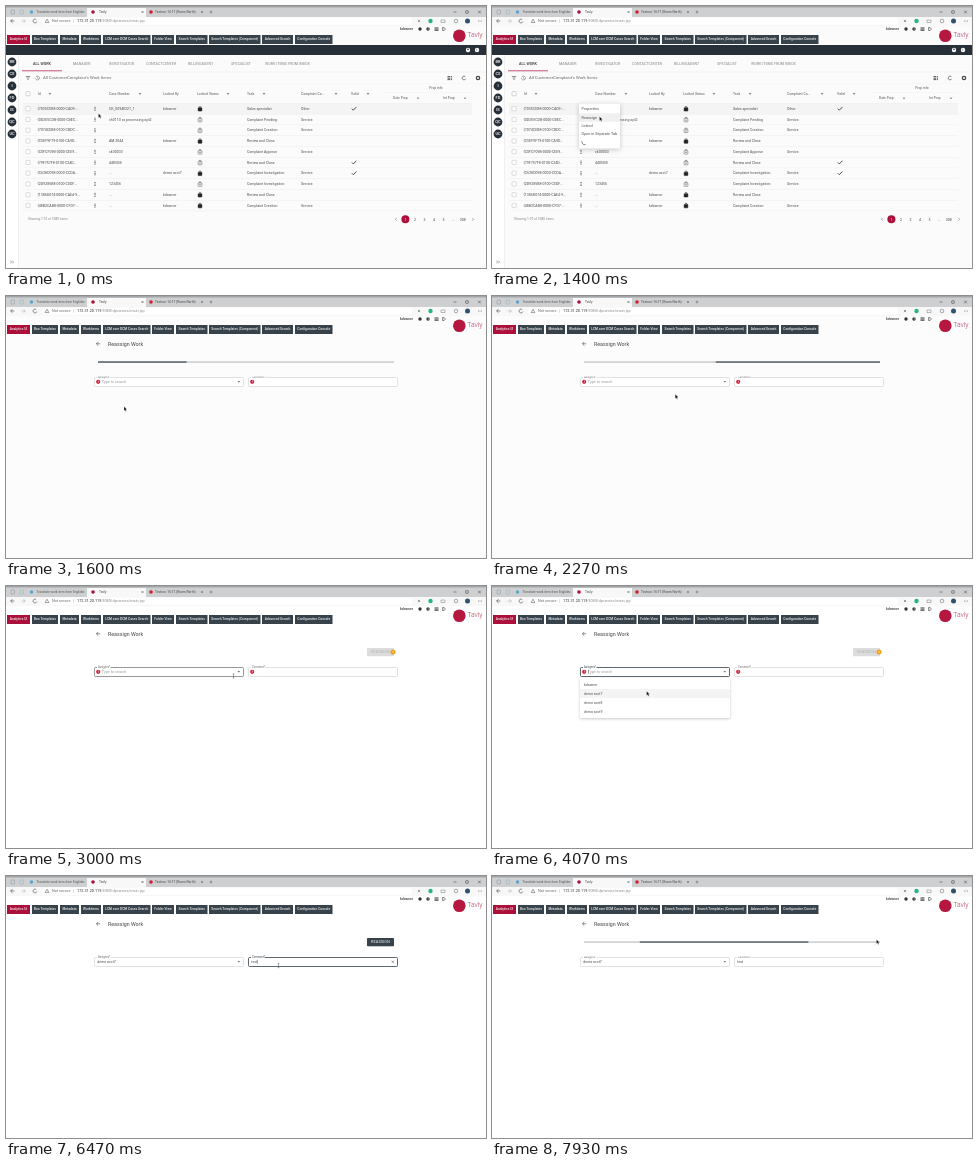
Recreate the animation shown at these times as an HTML page with a canvas. Size 480 by 262 pixels, loop 8 s.

```html
<!DOCTYPE html>
<html lang="en">
<head>
<meta charset="utf-8">
<title>Reassign work</title>
<style>
html, body { margin: 0; width: 100%; height: 100%; overflow: hidden; background: #fff; }
canvas { display: block; width: 480px; height: 262px; }
</style>
</head>
<body>
<canvas id="stage"></canvas>
<script>
const W = 480, H = 262, LOOP = 8000;
const canvas = document.getElementById('stage');
const dpr = window.devicePixelRatio || 1;
canvas.width = W * dpr;
canvas.height = H * dpr;
const c = canvas.getContext('2d');

const RED = '#ad0f3b', SLATE = '#37424b', INK = '#4a4a4a', ERR = '#d0213f';
const USER = 'kdowner', PICK = 'demo acct7', BRAND = 'Tavly';

// Event times in ms
const T = { menu: 480, page: 1435, ready: 2690, focus1: 3060, list: 3180, pick: 4480,
  close: 4610, focus2: 5190, type: 5700, send: 7460 };
const KEYS = [5700, 6000, 6330, 6470];
const PATH = [
  [0, 92.5, 107.5], [100, 92.5, 107.5], [380, 89.5, 103.5], [560, 89.5, 103.5],
  [1250, 107.5, 110.5], [1420, 107.5, 110.5], [1600, 118, 110.5], [1780, 118, 110.5],
  [2650, 227.5, 90], [3100, 227.5, 90], [3670, 212, 99], [4400, 112, 110],
  [4560, 112, 110], [5000, 272.5, 89.5], [7000, 272.5, 89.5], [7380, 384.5, 63.5], [8000, 384.5, 63.5]
];

const clamp = v => Math.max(0, Math.min(1, v));
const smooth = v => v * v * (3 - 2 * v);

function bezier(x1, y1, x2, y2) {
  const at = (s, a, b) => 3 * (1 - s) * (1 - s) * s * a + 3 * (1 - s) * s * s * b + s * s * s;
  return x => {
    if (x <= 0 || x >= 1) return clamp(x);
    let lo = 0, hi = 1;
    for (let i = 0; i < 24; i++) {
      const mid = (lo + hi) / 2;
      if (at(mid, x1, x2) < x) lo = mid; else hi = mid;
    }
    return at(lo, y1, y2);
  };
}
const easeLong = bezier(0.65, 0.815, 0.735, 0.395);
const easeShort = bezier(0.165, 0.84, 0.44, 1);

function rect(x, y, w, h, fill) {
  c.fillStyle = fill;
  c.fillRect(x, y, w, h);
}
function box(x, y, w, h, r, fill, stroke, lw = 0.5) {
  c.beginPath();
  c.roundRect(x, y, w, h, r);
  if (fill) { c.fillStyle = fill; c.fill(); }
  if (stroke) { c.strokeStyle = stroke; c.lineWidth = lw; c.stroke(); }
}
function dot(x, y, r, fill) {
  c.beginPath();
  c.arc(x, y, r, 0, 7);
  c.fillStyle = fill;
  c.fill();
}
function arc(x, y, r, a, b, stroke, lw = 0.6) {
  c.beginPath();
  c.arc(x, y, r, a, b);
  c.strokeStyle = stroke;
  c.lineWidth = lw;
  c.stroke();
}
// Polyline given as flat offsets from x, y
function line(x, y, pts, stroke, lw = 0.6) {
  c.beginPath();
  for (let i = 0; i < pts.length; i += 2) c.lineTo(x + pts[i], y + pts[i + 1]);
  c.strokeStyle = stroke;
  c.lineWidth = lw;
  c.stroke();
}
// Large font scaled down keeps glyph spacing even at tiny sizes
function text(s, x, y, size, fill = INK, weight = 400, align = 'left') {
  c.save();
  c.translate(x, y);
  c.scale(0.1, 0.1);
  c.font = `${weight} ${size * 10}px Roboto, "Open Sans", sans-serif`;
  c.textAlign = align;
  c.textBaseline = 'alphabetic';
  c.fillStyle = fill;
  c.fillText(s, 0, size * 3.5);
  const w = c.measureText(s).width / 10;
  c.restore();
  return w;
}
function cross(x, y, r, col, lw) {
  line(x, y, [-r, -r, r, r], col, lw);
  line(x, y, [-r, r, r, -r], col, lw);
}
function caretDown(x, y, col = '#555', r = 1.3) {
  c.beginPath();
  c.moveTo(x - r, y - r / 2);
  c.lineTo(x + r, y - r / 2);
  c.lineTo(x, y + r / 2);
  c.fillStyle = col;
  c.fill();
}
function arrowLeft(x, y, r, col, lw) {
  line(x, y, [r, 0, -r, 0], col, lw);
  line(x, y, [0, -r, -r, 0, 0, r], col, lw);
}

function browser() {
  rect(0, 0, W, 11, '#cdcfd1');
  rect(0, 0, W, 1.5, '#a3a6a8');
  rect(81, 2, 59, 9, '#f8f8f8');
  rect(0, 11, W, 9.2, '#f8f8f8');
  box(5, 4, 3.5, 4, 0.5, null, '#8a9096');
  box(14, 4, 3.5, 4, 0.5, null, '#8bb4c8');
  dot(25.5, 6, 1.7, '#5aa5cb');
  text('Translate work item from English', 30.5, 6, 3.2, '#555');
  cross(77.5, 6, 1, '#666', 0.4);
  dot(87, 6, 1.8, RED);
  text(BRAND, 93, 6, 3.3, '#444');
  cross(136.5, 6, 1, '#444', 0.5);
  dot(145, 6, 1.8, '#d11f2f');
  text('Testrun: 16:17 (Room North)', 149, 6, 3.2, '#444');
  cross(196, 6, 1, '#555', 0.5);
  line(205, 6, [-1.4, 0, 1.4, 0], '#555', 0.5);
  line(205, 6, [0, -1.4, 0, 1.4], '#555', 0.5);
  line(449, 6, [-1.5, 0, 1.5, 0], '#333', 0.5);
  box(459.7, 4.7, 2.6, 2.6, 0.3, null, '#333');
  cross(473.5, 6, 1.3, '#333', 0.5);

  arrowLeft(6.5, 15, 1.9, '#444', 0.6);
  line(17.5, 15, [-1.9, 0, 1.9, 0], '#b5b5b5');
  line(17.5, 15, [0, -1.9, 1.9, 0, 0, 1.9], '#b5b5b5');
  arc(29, 15, 1.9, 0.3, 5.4, '#444');
  box(36, 11.8, 370, 7, 3.5, '#fff');
  line(41, 15, [-1.9, 1.6, 0, -1.8, 1.9, 1.6, -1.9, 1.6], '#444', 0.5);
  text('Not secure', 46, 15, 3.8, '#666');
  rect(67, 13, 0.4, 4, '#bbb');
  const w = text('172.31.20.119', 71, 15, 3.8, '#333');
  text(':9080/dynamics/main.jsp', 71 + w, 15, 3.8, '#888');
  cross(413, 15, 1.1, '#666', 0.6);
  dot(424.5, 15, 2.2, '#27b580');
  line(437, 15, [-2, -1, 2, -1, 2, 1.5, -2, 1.5, -2, -1], '#777', 0.5);
  arc(450, 15, 1.8, 0, 7, '#6b7880');
  dot(461.5, 15, 2.5, '#2f5271');
  for (const d of [-1.4, 0, 1.4]) dot(474 + d, 15, 0.4, '#333');
}

const NAV = [
  [1, 23, 'Analytics UI'], [26, 26, 'Box Templates'], [54, 19, 'Metadata'],
  [75, 20, 'Workitems'], [97, 47.5, 'LCM over DCM Cases Search'], [146, 22, 'Folder View'],
  [170, 31.5, 'Search Templates'], [203, 51.5, 'Search Templates (Component)'],
  [256, 31, 'Advanced Search'], [289, 37.5, 'Configuration Console']
];
function header() {
  text(USER, 394, 23, 3.4, '#333', 500);
  dot(414, 23, 1.7, '#333');
  dot(422, 23, 1.7, '#333');
  text('i', 422, 23, 2.6, '#fff', 700, 'center');
  for (let i = 0; i < 3; i++) rect(428.5, 21.5 + i * 1.2, 4, 0.8, '#333');
  line(438, 23, [0.4, -1.5, -1.4, -1.5, -1.4, 1.5, 0.4, 1.5], '#333');
  line(438, 23, [-0.4, 0, 2, 0], '#333');
  dot(453.3, 29.7, 6.3, '#b5173f');
  text(BRAND, 461.2, 28.6, 6.8, '#b03a58', 300);
  NAV.forEach(([x, w, s], i) => {
    rect(x, 29, w, 9, i ? SLATE : RED);
    text(s, x + w / 2, 33.3, 3.3, '#f0f0f0', 500, 'center');
  });
}

const COLS = [[32, 'Id', 44], [103, 'Case Number', 134], [157, 'Locked By', 0], [191, 'Locked Status', 222],
  [241, 'Task', 258], [295, 'Complaint Ca...', 330], [345, 'Valid', 362]];
const SERVICE = 'Service';
const ROWS = [
  ['{7035CEB8-0000-CAD9-...', 'CK_00940321_1', USER, 1, 'Sales specialist', 'Other', 1],
  ['{0D3E5CDB-0000-CBEC...', 'ch0110 xx processing opt2', '', 0, 'Complaint Pending', SERVICE],
  ['{7074CEB8-0100-CBDC...', '', '', 0, 'Complaint Creation', SERVICE],
  ['{C5EF9F79-0100-CA9D...', 'AM 3044', USER, 1, 'Review and Close', ''],
  ['{C0FCF09B-0000-CEE9...', 'ck00033', '', 0, 'Complaint Approve', SERVICE],
  ['{79F757F8-0100-C24D...', '4485GB', '', 0, 'Review and Close', '', 1],
  ['{C638D098-0000-CCDA...', '...', PICK, 1, 'Complaint Investigation', SERVICE, 1],
  ['{2D9285B8-0100-CEDF...', '123456', '', 0, 'Complaint Investigation', SERVICE],
  ['{1386D074-0000-CAE4-9...', '...', USER, 1, 'Review and Close', ''],
  ['{48B2CAB8-0000-CFD7-...', '...', USER, 1, 'Complaint Creation', SERVICE]
];

function lock(x, y, shut) {
  arc(x, y - 1, 1.2, Math.PI, 7, shut ? '#222' : '#555', 0.6);
  box(x - 1.9, y - 0.9, 3.8, 3.3, 0.4, shut ? '#222' : '#fff', shut ? '#222' : '#555', 0.5);
  if (!shut) dot(x, y + 0.7, 0.6, '#555');
}

function workList() {
  rect(0, 20.2, W, H, '#fbfbfb');
  header();
  rect(0, 39, W, 10, '#273039');
  dot(462, 44, 2.2, '#fff');
  dot(462, 43.4, 0.8, '#273039');
  dot(471, 44, 2.2, '#fff');
  text('i', 471, 44, 3, '#273039', 700, 'center');

  rect(0, 49, 12.5, H, '#fff');
  rect(12.5, 49, 0.5, H, '#e2e2e2');
  ['BR', 'CS', 'I', 'FD', 'IS', 'QC', 'UC'].forEach((s, i) => {
    dot(6, 56 + i * 12, 4.4, '#273039');
    text(s, 6, 56 + i * 12, 4, '#fff', 500, 'center');
  });
  for (const d of [-1.2, 0.8]) line(5.5 + d, 256, [0, -1.4, 1.3, 0, 0, 1.4], '#555', 0.5);

  [[27, 'ALL WORK'], [67, 'MANAGER'], [103, 'INVESTIGATOR'], [140, 'CONTACTCENTER'], [182, 'BILLINGAGENT'],
    [225, 'SPECIALIST'], [259, 'WORK ITEMS FROM INBOX']]
    .forEach(([x, s], i) => text(s, x, 58, 3.7, i ? '#888' : '#333', i ? 400 : 500));
  rect(13, 65.8, W, 0.4, '#e4e4e4');
  rect(16, 64.5, 40, 0.7, RED);

  for (let i = 0; i < 3; i++) rect(19.8 + i * 0.8, 70.3 + i * 1.4, 4.4 - i * 1.6, 0.6, '#444');
  arc(31.5, 72, 2, -2.6, 3, '#555', 0.5);
  line(31.5, 72, [0, -1.1, 0, 0.2, 1, 0.7], '#555', 0.4);
  text("All CustomerComplaint's Work Items", 37, 72, 4.2, '#666');
  for (let i = 0; i < 3; i++) {
    rect(441.5, 70.2 + i * 1.5, 2.6, 0.9, '#444');
    rect(444.8, 70.2 + i * 1.5, 1.2, 0.9, '#444');
  }
  arc(458, 72, 1.8, 0.4, 5.6, '#444', 0.7);
  arc(472, 72, 1.7, 0, 7, '#444', 1.2);
  rect(13, 77.8, W, 0.3, '#ececec');

  box(20, 85.6, 4.2, 4.2, 0.6, '#fff', '#aaa');
  for (const [x, s, sort] of COLS) {
    text(s, x, 88, 3.4, '#777', 500);
    if (sort) caretDown(sort, 88);
  }
  text('Prop info', 430, 82.3, 3.3, '#777', 500, 'center');
  text('Date Prop', 387, 92.3, 3.3, '#777', 500);
  caretDown(412, 92.3);
  text('Int Prop', 437, 92.3, 3.3, '#777', 500);
  caretDown(459, 92.3);
  rect(378, 86.2, 88, 0.3, '#ececec');
  rect(17, 97.2, 449, 0.4, '#e4e4e4');

  ROWS.forEach(([id, num, by, shut, task, kind, ok], i) => {
    const y = 102.7 + i * 10.75;
    if (!i) rect(17, 97.5, 449, 10.6, '#f4f4f4');
    rect(17, y + 5.3, 449, 0.35, '#e6e6e6');
    box(20, y - 2.1, 4.2, 4.2, 0.6, '#fff', '#bbb');
    text(id, 31.5, y, 3.6, INK);
    for (const d of [-1.5, 0, 1.5]) dot(89, y + d, 0.55, '#333');
    text(num, 103, y, 3.55, INK);
    text(by, 157, y, 3.55, INK);
    lock(194, y, shut);
    text(task, 241, y, 3.55, INK);
    text(kind, 295, y, 3.55, INK);
    if (ok) line(348, y, [-2.2, 0, -0.7, 1.5, 2.4, -1.7], '#222', 0.8);
  });

  text('Showing 1-10 of 3080 items', 22, 213.3, 3.2, '#888');
  line(390, 213.3, [0.7, -1.4, -0.7, 0, 0.7, 1.4], '#555', 0.5);
  dot(399.4, 213.3, 4, RED);
  ['1', '2', '3', '4', '5', '...', '308'].forEach((s, i) =>
    text(s, 399.4 + i * 9.55, 213.3, 3.5, i ? '#444' : '#fff', 400, 'center'));
  line(467, 213.3, [-0.7, -1.4, 0.7, 0, -0.7, 1.4], '#555', 0.5);
}

function paper(x, y, w, h, blur) {
  c.save();
  c.shadowColor = 'rgba(0,0,0,.22)';
  c.shadowBlur = blur * dpr;
  c.shadowOffsetY = dpr;
  box(x, y, w, h, 1, '#fff');
  c.restore();
}

function menu(t) {
  const p = clamp((t - T.menu) / 200);
  if (!p) return;
  c.save();
  c.globalAlpha = p;
  paper(87, 97.5, 41, 45, 5);
  if (t > 900) rect(87, 107.3, 41, 8.4, '#f0f0f0');
  ['Properties', 'Reassign', 'Linked', 'Open in Separate Tab']
    .forEach((s, i) => text(s, 89.6, 103.1 + i * 8.3, 3.75, INK));
  const turn = Math.PI * 2 * (t - 1400) / 1400;
  arc(92.6, 136, 2.7, turn + 1.2, turn + 3.5, SLATE, 0.6);
  c.restore();
}

function progress(t, start) {
  const x = 92, w = 296, y = 65.4, h = 1.3, age = t - start;
  rect(x, y, w, h, '#c0c4c7');
  const bar = (l, r) => {
    l = clamp(l);
    r = clamp(r);
    if (r > l) rect(x + l * w, y, (r - l) * w, h, '#4c565e');
  };
  const a = easeLong((age % 2100) / 1260);
  bar(-0.35 + 1.35 * a, 1.9 * a);
  if (age > 1150) {
    const b = easeShort(((age - 1150) % 2100) / 1260);
    bar(-2 + 3.07 * b, 1.08 * b);
  }
}

function field(x, label, o) {
  const y = 81.5, w = 149, h = 9;
  const edge = o.focus ? SLATE : o.hover ? '#555' : '#cfcfcf';
  box(x + 0.5, y, w, h, 1, '#fff', edge, o.focus ? 0.8 : 0.6);
  rect(x + 3, y - 1, 13.5, 2, '#fff');
  text(label, x + 4, y - 0.8, 2.7, o.focus ? SLATE : '#666');
  let tx = x + 3.3;
  if (o.error) {
    dot(x + 4.2, 85.8, 2.1, ERR);
    rect(x + 3.95, 84.6, 0.5, 1.5, '#fff');
    rect(x + 3.95, 86.5, 0.5, 0.5, '#fff');
    tx = x + 7.8;
  }
  const tw = o.value ? text(o.value, tx, 85.8, 3.5, '#444') : 0;
  if (!o.value && o.hint) text(o.hint, tx, 85.8, 3.75, '#999');
  if (o.focus && o.caret) rect(tx + tw + 0.2, 83.7, 0.4, 4.2, '#333');
  if (o.focus && o.value) cross(x + w - (o.hint ? 11 : 4.2), 85.8, 1.2, '#555', 0.5);
  if (o.hint) caretDown(x + w - 4.2, 85.8, '#444');
}

function button(t) {
  const on = smooth(clamp((t - T.type) / 250));
  const face = (fill, ink) => {
    box(361, 62, 27, 8.2, 0.8, fill);
    text('REASSIGN', 374.5, 66, 4, ink, 400, 'center');
  };
  face('#dcdcdc', '#b4b4b4');
  if (on < 1) {
    c.globalAlpha = 1 - on;
    dot(387, 66, 2.5, '#f0a21d');
    rect(386, 65, 2, 1.6, '#f7c45a');
  }
  c.globalAlpha = on;
  face(t > 7300 ? '#29323a' : SLATE, '#f0f0f0');
  c.globalAlpha = 1;
}

function options(t) {
  const p = Math.min(clamp((t - T.list) / 120), clamp((T.close + 60 - t) / 60));
  if (!p) return;
  c.save();
  c.globalAlpha = p;
  paper(88, 92, 150, 40, 3);
  const over = Math.floor((mouse(t)[1] - 94) / 9);
  if (over >= 0 && over < 4) rect(88, 94 + over * 9, 150, 9, '#f4f4f4');
  [USER, PICK, 'demo acct8', 'demo acct9'].forEach((s, i) => text(s, 92, 98.5 + i * 9, 3.5, INK));
  c.restore();
}

function reassign(t) {
  const loading = t < T.ready, sent = t >= T.send;
  const [mx, my] = mouse(t);
  const over = x => my > 81 && my < 91 && mx > x && mx < x + 150;
  const typed = 'test'.slice(0, KEYS.filter(k => t >= k).length);
  rect(0, 20.2, W, H, loading ? '#fcfcfc' : '#fff');
  header();
  arrowLeft(92.3, 47.8, 1.9, '#444', 0.6);
  text('Reassign Work', 102, 47.8, 5.3, '#444');
  if (loading) progress(t, T.page);
  else if (sent) progress(t, T.send);
  else button(t);

  c.save();
  if (loading || sent) {
    c.beginPath();
    c.rect(0, 80.4, W, 30);
    c.clip();
  }
  const live = !loading && !sent;
  field(88, 'Assignee*', {
    error: t < T.pick, value: t < T.pick ? '' : PICK, hint: 'Type to search',
    focus: t >= T.focus1 && t < T.focus2, hover: live && over(88), caret: t > 4500 || t % 1000 < 500
  });
  field(242, 'Comment*', {
    error: !typed, value: typed, focus: t >= T.focus2 && !sent,
    hover: live && over(242), caret: true
  });
  c.restore();
  options(t);
}

function mouse(t) {
  const i = Math.max(1, PATH.findIndex(k => k[0] > t));
  const [t0, x0, y0] = PATH[i - 1], [t1, x1, y1] = PATH[i];
  const p = smooth(clamp((t - t0) / (t1 - t0)));
  return [x0 + (x1 - x0) * p, y0 + (y1 - y0) * p];
}

function pointer(t) {
  const [x, y] = mouse(t);
  const inField = t > T.page && y > 81 && y < 91 && x > 88 && x < 392;
  if (inField) {
    line(x, y, [0, -2, 0, 2], '#444', 0.5);
    line(x, y, [-0.9, -2.2, 0.9, -2.2], '#444', 0.4);
    line(x, y, [-0.9, 2.2, 0.9, 2.2], '#444', 0.4);
    return;
  }
  c.beginPath();
  [[0, 0], [0, 4.3], [1, 3.4], [1.7, 5], [2.4, 4.7], [1.7, 3.1], [3, 3]].forEach(([a, b]) => c.lineTo(x + a, y + b));
  c.closePath();
  c.fillStyle = '#111';
  c.fill();
  c.strokeStyle = '#fff';
  c.lineWidth = 0.2;
  c.stroke();
}

function draw(t) {
  c.setTransform(dpr, 0, 0, dpr, 0, 0);
  c.globalAlpha = 1;
  if (t < T.page) {
    workList();
    menu(t);
  } else {
    reassign(t);
  }
  browser();
  pointer(t);
}

const begin = performance.now();
function tick() {
  draw((performance.now() - begin) % LOOP);
  requestAnimationFrame(tick);
}
tick();
</script>
</body>
</html>
```
